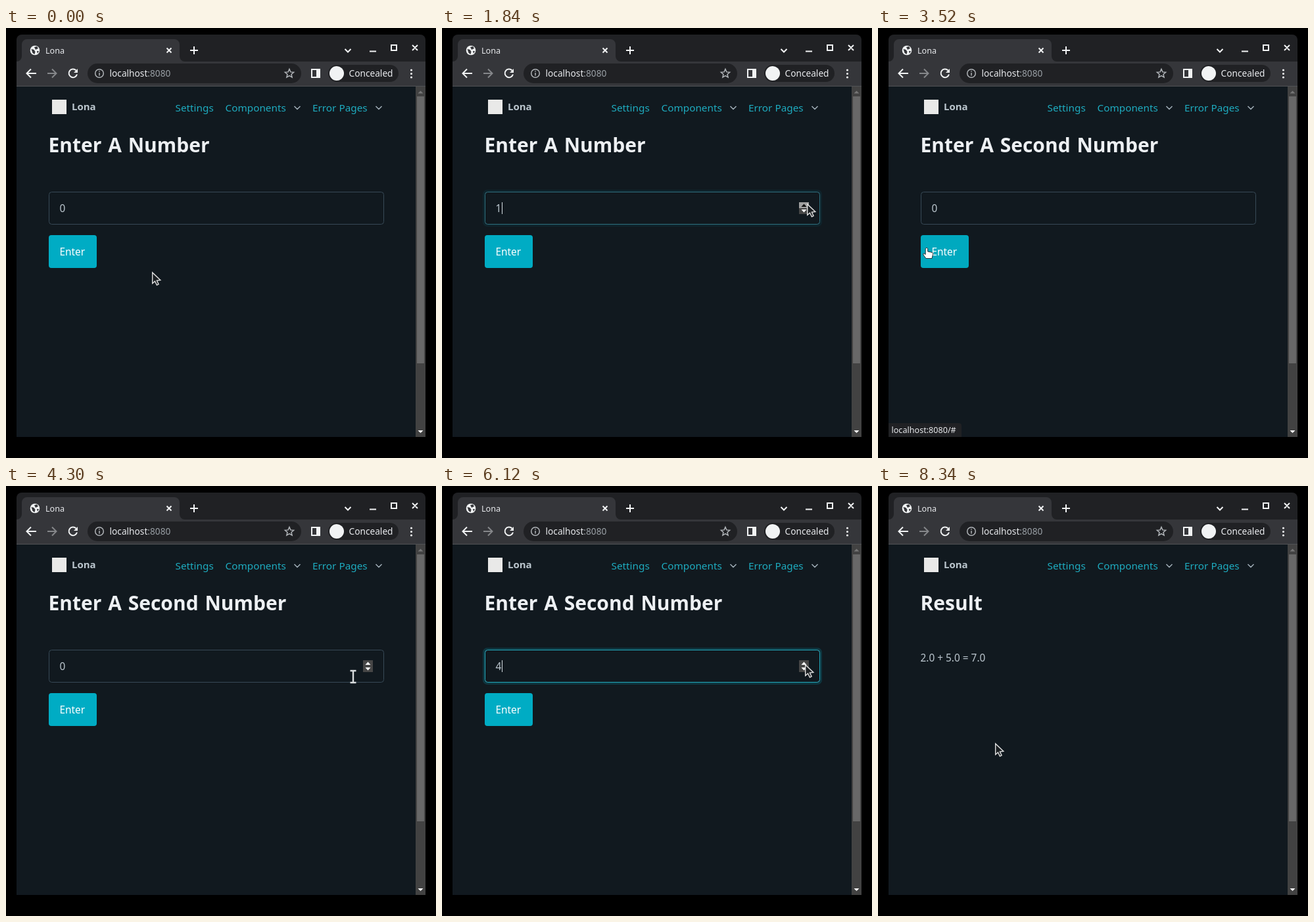
Animation, 654 px wide and 654 px high, one loop 8580 ms. Source, as an HTML page:

```html
<!DOCTYPE html>
<html lang="en">
<head>
<meta charset="utf-8">
<title>Number form</title>
<style>
html, body { margin: 0; width: 100%; height: 100%; overflow: hidden; background: #000; }
svg { display: block; }
text { font: 15.4px "Noto Sans", "Open Sans", sans-serif; fill: #bbc6ce; }
.ui { fill: #e8eaed; font-size: 13.7px; }
.small { font-size: 12.6px; }
.link { fill: #1eabbf; font-size: 15.3px; }
.brand { font-weight: 700; font-size: 15px; }
.title { font-weight: 700; font-size: 30px; word-spacing: 2px; fill: #edf0f3; }
.line { fill: none; stroke: #f1f3f4; stroke-width: 2; }
</style>
</head>
<body>
<svg width="654" height="654" viewBox="0 0 654 654">
  <!-- window frame -->
  <path d="M16 89V18a8 8 0 0 1 8-8H630a8 8 0 0 1 8 8V89z" fill="#202124"/>
  <path d="M16 51a8 8 0 0 0 8-8V25a8 8 0 0 1 8-8H256a8 8 0 0 1 8 8V43a8 8 0 0 0 8 8H638V88H16z" fill="#35363a"/>
  <path d="M16 88.5H638" stroke="#515356"/>

  <!-- tab and window buttons -->
  <circle cx="44" cy="34" r="7.3" fill="#f1f3f4"/>
  <path d="M38.5 32l4 1 2 3-1 4-3-2zM43 29l4-1 2 3-4 2zM47 35h3l-2 4z" fill="#35363a"/>
  <text class="ui small" x="60" y="39">Lona</text>
  <path class="line" d="M244.500 30.500l7 7m0-7l-7 7M280 34h12M286 28v12"/>
  <path class="line" d="M515.500 32l4.500 4.500 4.500-4.500M553 35.500h10M586 26h8v8h-8zM618 26l8 8m0-8l-8 8"/>

  <!-- toolbar -->
  <path id="back" class="line" d="M46 69H32M38 62.500L31.500 69 38 75.500"/>
  <path class="line" d="M63 69H77M70 62.500L76.500 69 70 75.500" style="stroke:#85878a"/>
  <path class="line" d="M106.500 64.500A6.300 6.300 0 1 0 108 70.500"/>
  <path d="M109 62v6h-6z" fill="#f1f3f4"/>
  <rect x="124" y="54" width="325" height="30" rx="15" fill="#202124"/>
  <g fill="none" stroke="#b0b4b8" stroke-width="1.500">
    <circle cx="142" cy="69" r="6.300"/>
    <path d="M142 68v4.500M142 65v1.500"/>
    <path d="M431 62.500l1.900 4.400 4.700.4-3.600 3.100 1.100 4.600-4.100-2.400-4.100 2.400 1.100-4.600-3.600-3.100 4.700-.4z"/>
  </g>
  <text class="ui" x="157.500" y="74">localhost<tspan fill="#9aa0a6">:8080</tspan></text>
  <path class="line" d="M465 63h12v12h-12z"/>
  <path d="M472 62h6v14h-6z" fill="#f1f3f4"/>
  <rect x="490" y="56" width="107" height="26" rx="13" fill="#202124"/>
  <circle cx="503" cy="69" r="11" fill="#f1f3f4"/>
  <text class="ui" x="521.500" y="74">Concealed</text>
  <path d="M616.500 64h0m0 5.500h0m0 5.500h0" stroke="#f1f3f4" stroke-width="3.200" stroke-linecap="round"/>

  <!-- page -->
  <rect x="16" y="89" width="607" height="533" fill="#11191f"/>
  <rect x="623" y="89" width="15" height="533" fill="#424242"/>
  <rect x="625" y="104" width="11" height="406" fill="#686868"/>
  <path d="M626.500 99.500l4-4 4 4z" fill="#767676"/>
  <path d="M626.500 612l4 4 4-4z" fill="#fff"/>
  <rect x="70" y="109" width="22" height="22" fill="#e9e9e8"/>
  <text class="brand" x="100" y="125">Lona</text>
  <text class="link" x="257.500" y="127">Settings</text>
  <text class="link" x="333.500" y="127">Components</text>
  <text class="link" x="466" y="127">Error Pages</text>
  <path d="M438.500 119l4.500 4.500 4.500-4.500M562.500 119l4.500 4.500 4.500-4.500" fill="none" stroke="#a2afb9" stroke-width="1.500"/>
  <text id="title" class="title" x="64.500" y="189"></text>

  <g id="form">
    <rect x="65.500" y="249.500" width="509" height="49" rx="4" fill="none" stroke="#374956"/>
    <g id="focus" fill="none">
      <rect x="63.500" y="247.500" width="513" height="53" rx="5.500" stroke="#00acc1" stroke-width="3" stroke-opacity=".2"/>
      <rect x="65.500" y="249.500" width="509" height="49" rx="4" stroke="#22a9bc"/>
    </g>
    <text id="value" x="81.500" y="280"></text>
    <path id="caret" d="M91.500 265v18" stroke="#d5dde2"/>
    <g id="spinner">
      <rect x="543" y="265" width="15" height="18" fill="#464646"/>
      <rect id="pressed" x="543" y="265" width="15" height="9" fill="#a0a0a0"/>
      <path id="up" d="M546.500 272l4-4.500 4 4.500z"/>
      <path d="M546.500 276l4 4.500 4-4.500z" fill="#fff"/>
    </g>
    <rect id="button" x="65" y="315" width="73" height="50" rx="4"/>
    <text x="81.500" y="346" style="fill:#fff">Enter</text>
  </g>
  <text id="result" x="64.500" y="267">2.0 + 5.0 = 7.0</text>

  <g id="status">
    <path d="M16 601H123a4 4 0 0 1 4 4V622H16z" fill="#202124"/>
    <text class="ui small" x="20.500" y="616">localhost:8080/#</text>
  </g>

  <!-- pointers, each with its hot spot at 0,0 -->
  <g id="pointer">
    <path id="arrow" d="M.7 1V17.500l3.800-3.300 2.900 5.800 2.700-1.300-2.700-5.700 5.400-.5z" fill="#1b1f22" stroke="#dedede" stroke-width="1.400"/>
    <path id="ibeam" d="M-4.500-9H4.500M0-9V9M-4.500 9H4.500" fill="none" stroke="#d9dcde" stroke-width="2.400"/>
    <path id="hand" d="M-1.800 1.500Q0-1 1.700 1.500V6l6.300 1.300q2 .5 1.600 2.500L8 16.500H-1L-5 11q-.8-2 1-2.200l2.200 1.700z" fill="#fff" stroke="#1b1f22" stroke-width=".9"/>
  </g>
</svg>
<script>
const LOOP = 8580, POINTER_STEP = 78, HOLD = 85, FADE = 200;
const el = Object.fromEntries([...document.querySelectorAll('[id]')].map(node => [node.id, node]));
const show = (node, on) => node.setAttribute('visibility', on ? 'inherit' : 'hidden');
const clamp = v => Math.max(0, Math.min(1, v));
const smooth = k => k * k * (3 - 2 * k);

// Clicks raise the number by one; blur is the moment the button is clicked
const pages = [
  { start: 0, title: 'Enter A Number', clicks: [1760, 2150], blur: 3210 },
  { start: 3360, title: 'Enter A Second Number', clicks: [5010, 5390, 5720, 6030, 6360], blur: 7480 },
  { start: 7620, title: 'Result', clicks: [], blur: LOOP }];

// The pointer rests between these curved moves
const REST = [222, 371];
const LEAVE = 7950;
const moves = [
  { start: 240, end: 1120, bend: [565, 300], to: [555, 267] },
  { start: 2390, end: 3190, bend: [330, 580], to: [74, 334] },
  { start: 3515, end: 4510, bend: [470, 355], to: [552, 271] },
  { start: 6755, end: 7220, bend: [300, 450], to: [121, 358] },
  { start: LEAVE, end: 8330, bend: [140, 385], to: [178, 391] }];

function pointerAt(t) {
  let from = REST;
  for (const { start, end, bend, to } of moves) {
    if (t < start) break;
    const steps = Math.floor((t - start) / POINTER_STEP);
    const u = smooth(clamp(steps * POINTER_STEP / (end - start))), v = 1 - u;
    from = from.map((p, i) => Math.round(v * v * p + 2 * u * v * bend[i] + u * u * to[i]));
  }
  return from;
}

function render(t) {
  const page = pages.filter(p => p.start <= t).pop();
  const done = page.title === 'Result';
  const clicks = page.clicks.filter(time => time <= t);
  const sinceClick = t - clicks[clicks.length - 1];
  const focused = clicks.length > 0 && t < page.blur;
  const pressed = sinceClick < HOLD;
  const focusLevel = clamp((t - page.clicks[0]) / FADE) - clamp((t - page.blur) / FADE);

  const [x, y] = pointerAt(t);
  const inside = (left, top, right, bottom) => x >= left && x <= right && y >= top && y <= bottom;
  const overInput = !done && inside(65, 249, 575, 299);
  const overSpinner = overInput && inside(542, 262, 559, 284);
  const overButton = t < LEAVE && inside(65, 315, 138, 365);

  el.title.textContent = page.title;
  el.value.textContent = clicks.length;
  show(el.form, !done);
  show(el.result, done);
  el.focus.setAttribute('opacity', focusLevel || 0);
  show(el.caret, focused && sinceClick % 1000 < 500);
  show(el.spinner, focused || overInput);
  show(el.pressed, pressed);
  el.up.setAttribute('fill', pressed ? '#111' : '#fff');
  el.button.setAttribute('fill', overButton ? '#00a9bf' : '#00acc4');
  show(el.status, (t >= 3280 && t < 4200) || (t >= 7400 && t < 8100));

  el.pointer.setAttribute('transform', `translate(${x} ${y})`);
  show(el.hand, overButton);
  show(el.ibeam, overInput && !overSpinner);
  show(el.arrow, !overButton && (!overInput || overSpinner));
}

function frame() {
  render(performance.now() % LOOP);
  requestAnimationFrame(frame);
}
frame();
</script>
</body>
</html>
```
